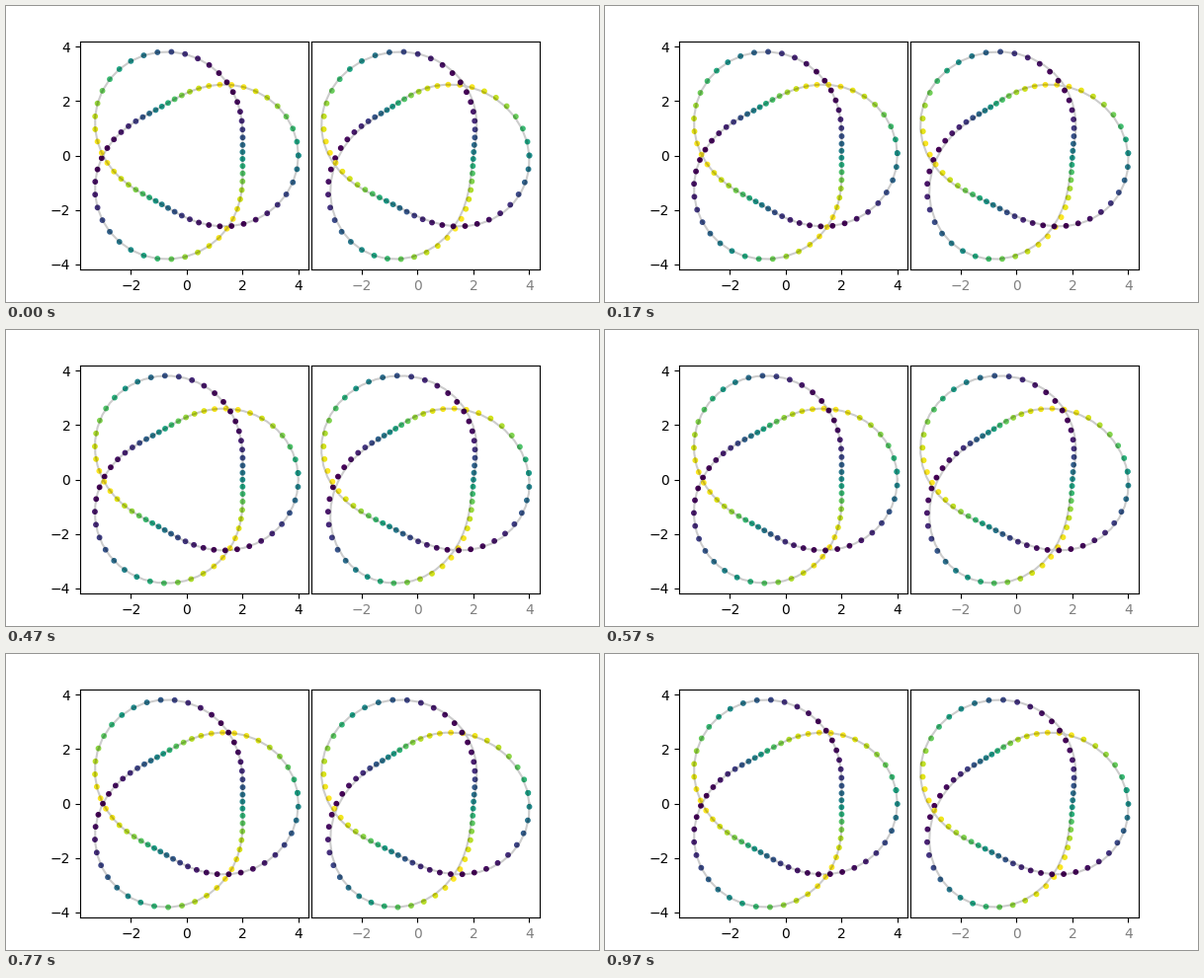
A matplotlib script for the animation above (1.01 s loop, 600 by 300 pixels).

```python
import numpy as np
import matplotlib.pyplot as plt
from matplotlib.animation import FuncAnimation

POINTS = 100
STEPS = 30
TICK_MS = 10
TICKS = 101
EYE_SPACING = 65
EYE_DISTANCE = 350


def trefoil(phase=0.0):
    """Points along a trefoil knot, advanced by a fraction of their spacing."""
    phi = np.linspace(0, 2 * np.pi, POINTS) + phase * 2 * np.pi / (POINTS - 1)
    radius = 3 + np.cos(3 * phi)
    return radius * np.cos(2 * phi), radius * np.sin(2 * phi), np.sin(3 * phi)


def parallax(z):
    return EYE_SPACING * z / (EYE_DISTANCE + z)


fig, axes = plt.subplots(1, 2, sharex=True, sharey=True, figsize=(6, 3), dpi=100,
                         gridspec_kw={"wspace": 0.01})
axes[1].tick_params(axis="y", left=False, labelleft=False)
axes[1].tick_params(axis="x", labelcolor="gray")

# Share of the parallax applied in each view: to the curve and to the dots.
CURVE_SHIFT = (0, 1)
DOT_SHIFT = (0, 0.5)

x, y, z = trefoil()
dots = []
for ax, curve_shift, dot_shift in zip(axes, CURVE_SHIFT, DOT_SHIFT):
    ax.plot(x - curve_shift * parallax(z), y, color="k", alpha=0.2)
    dots.append(ax.scatter(x - dot_shift * parallax(z), y, c=z, s=10,
                           cmap="viridis", vmin=-1, vmax=1))


def update(tick):
    # Thirty steps per second, with step times rounded to whole ticks.
    step = min((3 * tick + 1) // 10, STEPS - 1)
    x, y, z = trefoil(step / STEPS)
    for dot, shift in zip(dots, DOT_SHIFT):
        dot.set_offsets(np.column_stack([x - shift * parallax(z), y]))
        dot.set_array(z)
    return dots


anim = FuncAnimation(fig, update, frames=TICKS, interval=TICK_MS,
                     repeat=True, repeat_delay=0)
plt.show()
```
